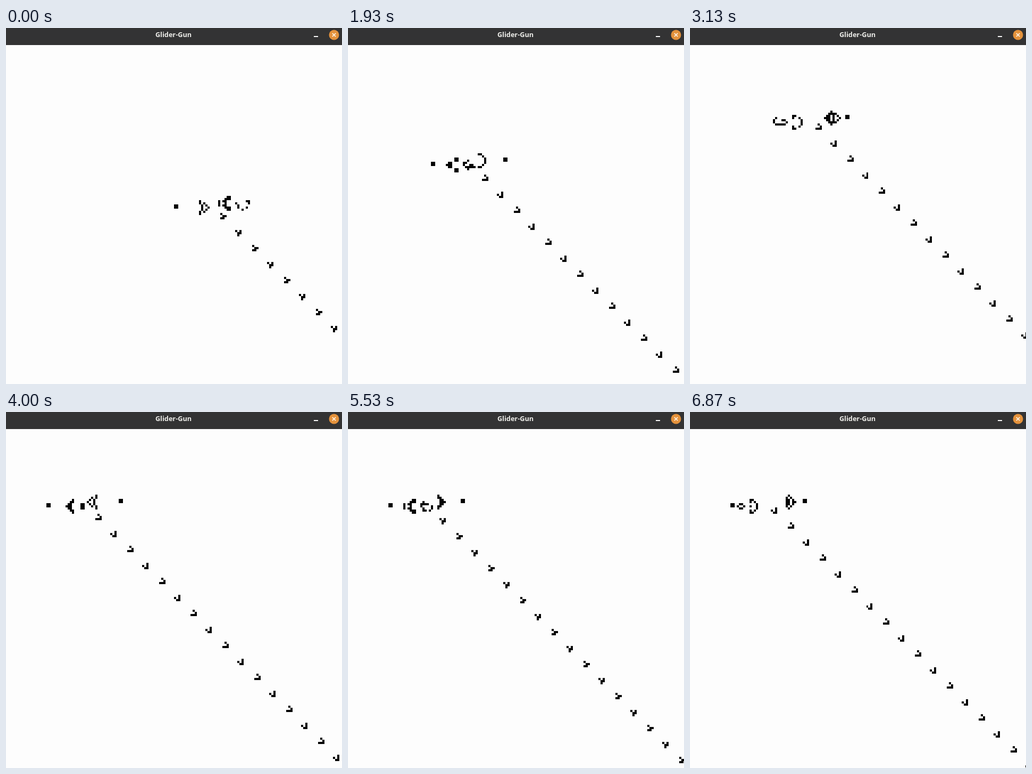
Animation, 632 px wide and 668 px high, one loop 6910 ms. Source, as an HTML page with a canvas:

```html
<!DOCTYPE html>
<html lang="en">
<head>
<meta charset="utf-8">
<title>Glider-Gun</title>
<style>
  html, body { margin: 0; width: 100%; height: 100%; overflow: hidden; background: #fdfdfd; }
  canvas { display: block; }
</style>
</head>
<body>
<canvas id="stage" width="632" height="668"></canvas>
<script>
const W = 632, H = 668, BAR = 32, CELL = 3.994, TOP = 31.5;
const LOOP = 6910, PERIOD = 30, LAST = 206;
const ctx = document.getElementById('stage').getContext('2d');

// Run-length rows: b is a dead cell, o a live one.
const GUN = [
  '24bo', '22bobo', '12b2o6b2o12b2o', '11bo3bo4b2o12b2o', '2o8bo5bo3b2o',
  '2o8bo3bob2o4bobo', '10bo5bo7bo', '11bo3bo', '12b2o'
];

// Cells live in one integer key: row * SPAN + column, with a margin on all sides.
const SPAN = 1024, PAD = 64;
const keyOf = (x, y) => (y + PAD) * SPAN + x + PAD;
const NEAR = [-SPAN - 1, -SPAN, -SPAN + 1, -1, 1, SPAN - 1, SPAN, SPAN + 1];

function parse(rows) {
  const live = new Set();
  rows.forEach((row, y) => {
    let x = 0;
    for (const [, n, kind] of row.matchAll(/(\d*)([bo])/g)) {
      for (let i = +n || 1; i > 0; i--, x++) if (kind === 'o') live.add(keyOf(x, y));
    }
  });
  return live;
}

function step(live) {
  const count = new Map();
  for (const key of live) {
    for (const d of NEAR) count.set(key + d, (count.get(key + d) || 0) + 1);
  }
  const next = new Set();
  for (const [key, n] of count) if (n === 3 || (n === 2 && live.has(key))) next.add(key);
  return next;
}

// Warm up until the glider stream leaves the view, then keep one full period.
function buildCycle() {
  let live = parse(GUN);
  for (let i = 0; i < PERIOD * 24; i++) live = step(live);
  const cycle = [];
  for (let i = 0; i < PERIOD; i++, live = step(live)) {
    cycle.push([...live].map(k => [k % SPAN - PAD, Math.floor(k / SPAN) - PAD]));
  }
  return cycle;
}
const cycle = buildCycle();

// [tick, generation]: the speed varies slightly along the way.
const PACE = [[0, 26], [35, 126], [58, 185], [94, 289], [145, 430], [187, 542], [206, 587]];
function generation(tick) {
  let i = 1;
  while (i < PACE.length - 1 && tick > PACE[i][0]) i++;
  const [t0, g0] = PACE[i - 1], [t1, g1] = PACE[i];
  return Math.round(g0 + (g1 - g0) * (tick - t0) / (t1 - t0));
}

// [time, columns, rows]: the view jumps by 20 cells.
const PANS = [[1430, -20, 0], [1600, -20, 0], [1770, 0, -20], [2530, 0, -20], [3970, -20, 0]];
function origin(time) {
  let col = 79, row = 71;
  for (const [at, dx, dy] of PANS) if (time >= at) { col += dx; row += dy; }
  return [col, row];
}

const edgeX = col => Math.round(col * CELL);
const edgeY = row => Math.round(TOP + row * CELL);

function drawCell(col, row) {
  const x = edgeX(col), y = edgeY(row);
  ctx.fillRect(x, y, edgeX(col + 1) - x, edgeY(row + 1) - y);
}

function line(color, width, ...segments) {
  ctx.strokeStyle = color;
  ctx.lineWidth = width;
  ctx.beginPath();
  for (const [x0, y0, x1, y1] of segments) { ctx.moveTo(x0, y0); ctx.lineTo(x1, y1); }
  ctx.stroke();
}

function drawBar() {
  ctx.fillStyle = '#333334';
  ctx.fillRect(0, 0, W, BAR);
  ctx.fillStyle = '#eeeeea';
  ctx.font = 'bold 12.7px "Open Sans", "Noto Sans", sans-serif';
  ctx.textAlign = 'center';
  ctx.textBaseline = 'alphabetic';
  ctx.fillText('Glider-Gun', 315, 17);
  ctx.fillStyle = '#fafafa';
  ctx.fillRect(579, 15, 8, 2);
  ctx.fillStyle = '#e4923c';
  ctx.beginPath();
  ctx.arc(617, 13, 9.5, 0, Math.PI * 2);
  ctx.fill();
  line('#fdeedd', 1.8, [613.8, 9.8, 620.2, 16.2], [620.2, 9.8, 613.8, 16.2]);
}

function draw(time) {
  const whole = Math.floor(time / 10) * 10;
  const tick = Math.min(LAST, Math.floor((whole + 3.4) * 0.03));
  const [col, row] = origin(whole);
  ctx.fillStyle = '#fdfdfd';
  ctx.fillRect(0, 0, W, H);
  ctx.fillStyle = '#030303';
  for (const [x, y] of cycle[generation(tick) % PERIOD]) drawCell(col + x, row + y);
  drawBar();
}

const start = performance.now();
function frame() {
  draw((performance.now() - start) % LOOP);
  requestAnimationFrame(frame);
}
frame();
</script>
</body>
</html>
```
